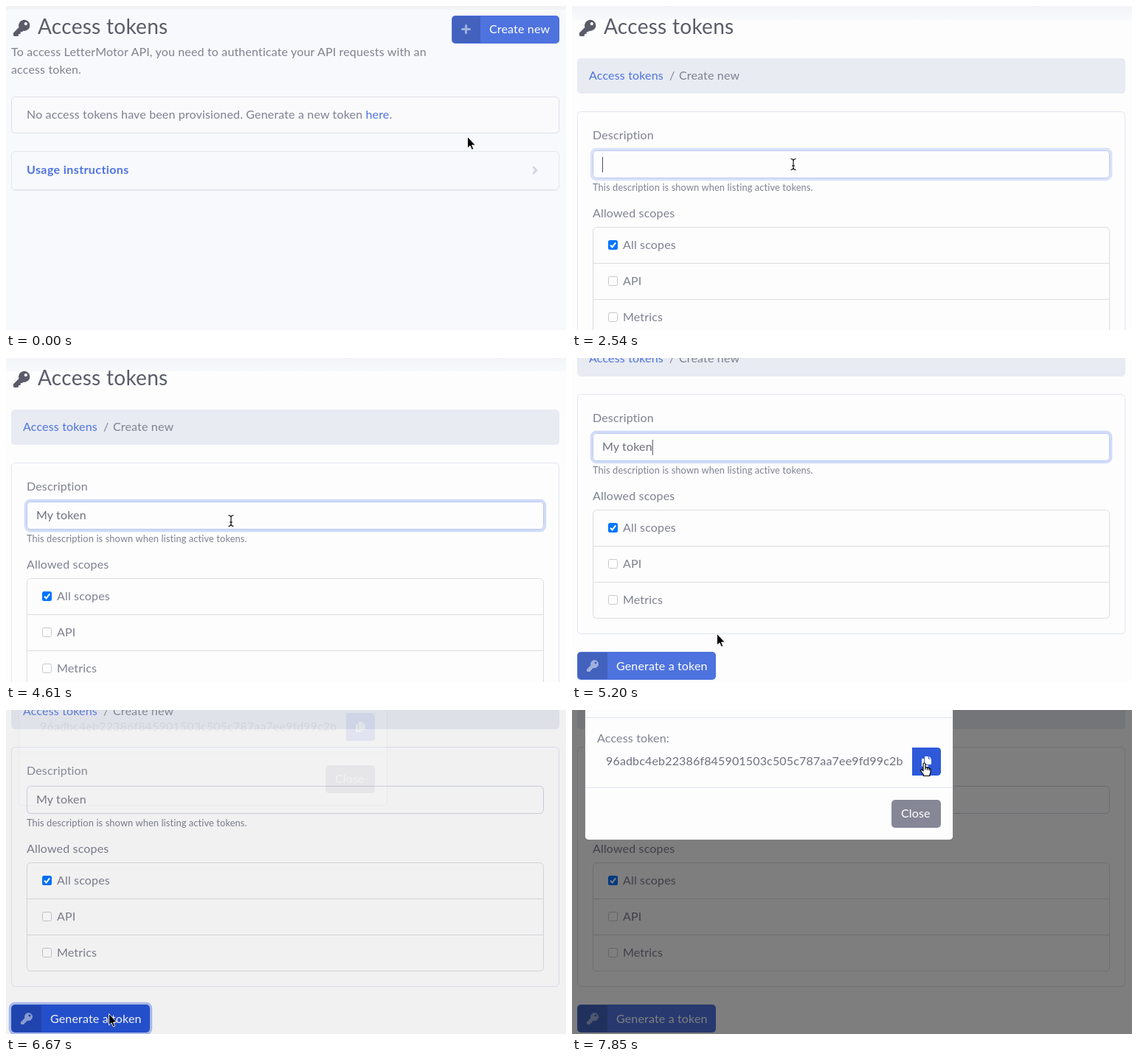
Recreate the animation shown at these times as an HTML page. Size 759 px wide and 440 px high, loop 8000 ms.

```html
<!DOCTYPE html>
<html lang="en">
<head>
<meta charset="utf-8">
<title>Access tokens</title>
<style>
  html, body { margin: 0; width: 100%; height: 100%; overflow: hidden; background: #f8f9fd; }
  svg { display: block; }
  text { font: 16px Lato, sans-serif; letter-spacing: .01em; fill: #7f8190; white-space: pre; }
  .title { font-size: 28px; fill: #5a5c69; }
  .small { font-size: 12.8px; }
  .bold { font-weight: 700; letter-spacing: .025em; }
  .link { fill: #4e73df; }
  .entry { fill: #6e707e; }
  .light { fill: #fff; }
  .shade { fill: #000; fill-opacity: .15; }
  .icon { fill: #fff; fill-opacity: .5; }
  .card { fill: none; stroke: #e3e6f0; }
  .rule { fill: none; stroke: #dcdde0; }
  .ring { fill: none; stroke-width: 3.2; }
</style>
</head>
<body>
<svg width="759" height="440" viewBox="0 0 759 440">
  <defs>
    <path id="key" fill-rule="evenodd" d="M32 11A11 11 0 0 1 19 21.8L17.4 23.5H14V26.5Q14 28 12.5 28H10V30.5Q10 32 8.5 32H1.5Q0 32 0 30.5V25.6L10.6 15A11 11 0 1 1 32 11ZM24 5a3 3 0 1 0 .01 0Z"/>
    <g id="heading">
      <use href="#key" transform="translate(10 18.5) scale(.7)" fill="#5a5c69"/>
      <text class="title" x="43" y="38">Access tokens</text>
    </g>
    <rect id="box" x="49.5" width="12" height="12" rx="2" fill="#fff" stroke="#c8c8cc"/>
    <path id="beamShape" d="M-3.5 -7.5Q0 -7 0 -5V5Q0 7 -3.5 7.5M3.5 -7.5Q0 -7 0 -5M0 5Q0 7 3.5 7.5M-2 2H2"/>
    <linearGradient id="topShade" x2="0" y2="1">
      <stop offset="0" stop-color="#f3f4f7"/>
      <stop offset="1" stop-color="#f8f9fc"/>
    </linearGradient>
    <clipPath id="tokenClip"><rect x="40" y="50" width="411" height="40"/></clipPath>
  </defs>

  <g id="listPage">
    <rect width="759" height="440" fill="#f8f9fd"/>
    <rect width="759" height="5" fill="#f2f3f5"/>
    <use href="#heading"/>
    <text x="7" y="68">To access LetterMotor API, you need to authenticate your API requests with an</text>
    <text x="7" y="92">access token.</text>
    <rect id="createRing" class="ring" x="602.4" y="11.4" width="149.2" height="41.2" rx="6.5" stroke="#6988e4" stroke-opacity=".5"/>
    <rect id="create" x="604" y="13" width="146" height="38" rx="5"/>
    <path class="shade" d="M643 14H609Q605 14 605 18V46Q605 50 609 50H643Z"/>
    <path d="M623.5 26.5V36.5M618.5 31.5H628.5" stroke="#fff" stroke-opacity=".5" stroke-width="3" stroke-linecap="round"/>
    <text class="light" x="655" y="37">Create new</text>
    <rect x="7.5" y="123.5" width="742" height="49" rx="5" fill="#fafafd" stroke="#dddfe8"/>
    <text x="28" y="153">No access tokens have been provisioned. Generate a new token <tspan class="link">here</tspan>.</text>
    <rect class="card" x="7.5" y="197.5" width="742" height="52.5" rx="5"/>
    <path d="M10 249.8H747" stroke="#dcdfe8"/>
    <text class="link bold" x="28" y="228">Usage instructions</text>
    <path d="M715 219L719 223L715 227" fill="none" stroke="#d1d3e2" stroke-width="2.6" stroke-linecap="round"/>
  </g>

  <g id="formPage">
    <rect width="759" height="440" fill="#fdfdfe"/>
    <g id="content">
      <rect width="759" height="19" fill="url(#topShade)"/>
      <use href="#heading"/>
      <rect x="7" y="71" width="743" height="48" rx="5" fill="#e8ebf2"/>
      <text class="link" x="23" y="100">Access tokens</text>
      <text x="132" y="100">/</text>
      <text x="145" y="100">Create new</text>
      <rect class="card" x="7.5" y="143.5" width="742" height="325" rx="5"/>
      <text x="28" y="181">Description</text>
      <rect id="inputRing" class="ring" x="26.4" y="194.4" width="704.2" height="41.2" rx="6.5" stroke="#4e73df"/>
      <rect id="input" x="28.5" y="196.5" width="700" height="37" rx="5" fill="#fdfdfe"/>
      <text id="typed" class="entry" x="41" y="220"></text>
      <rect id="caret" y="205" width="1" height="21" fill="#4c4d58"/>
      <text class="small" x="28" y="251">This description is shown when listing active tokens.</text>
      <text x="28" y="287">Allowed scopes</text>
      <rect class="rule" x="28.5" y="300.5" width="700" height="147" rx="5"/>
      <path class="rule" d="M29 349.5H728M29 398.5H728"/>
      <rect x="49" y="318" width="13" height="13" rx="2.5" fill="#0075ff"/>
      <path d="M52 324.8L54.6 327.4L59.2 321.4" fill="none" stroke="#fff" stroke-width="2"/>
      <use href="#box" y="367.5"/>
      <use href="#box" y="416.5"/>
      <text x="69" y="330">All scopes</text>
      <text x="69" y="379">API</text>
      <text x="69" y="428">Metrics</text>
      <rect id="generateRing" class="ring" x="5.4" y="491.4" width="191.2" height="41.2" rx="6.5" stroke="#6988e4" stroke-opacity=".5"/>
      <rect id="generate" x="7" y="493" width="188" height="38" rx="5"/>
      <path class="shade" d="M48 494H12Q8 494 8 498V526Q8 530 12 530H48Z"/>
      <use href="#key" class="icon" transform="translate(20 504) scale(.5)"/>
      <text class="light" x="60" y="518">Generate a token</text>
    </g>
  </g>

  <rect id="backdrop" width="759" height="440"/>
  <g id="modal">
    <rect x="17.5" y="-60" width="499" height="236.5" rx="5" fill="#fdfdfe" stroke="#000" stroke-opacity=".3"/>
    <path d="M18 10.5H516M18 105.5H516" stroke="#e3e6f0"/>
    <text x="34" y="44">Access token:</text>
    <text class="entry" x="46" y="75" clip-path="url(#tokenClip)">96adbc4eb22386f845901503c505c787aa7ee9fd99c2b</text>
    <path id="copy" d="M461 51H495Q500 51 500 56V84Q500 89 495 89H461Z"/>
    <path transform="translate(474 63)" fill="#fff" d="M0 4Q0 3 1 3H3V10.5Q3 12 4.5 12H9V13Q9 14 8 14H1Q0 14 0 13ZM4 1Q4 0 5 0H9V3.5H13V10Q13 11 12 11H5Q4 11 4 10ZM10 0L13 2.7H10Z"/>
    <rect x="433" y="122" width="67" height="38" rx="5" fill="#858796"/>
    <text class="light" x="446" y="146">Close</text>
  </g>

  <g id="pointer">
    <path id="arrow" d="M-.5 -.5V15L3 11.8L5.4 17.2L7.8 16.2L5.5 11H10.3Z" stroke="#fff" stroke-width=".9"/>
    <g id="beam" fill="none">
      <use href="#beamShape" stroke="#fff" stroke-width="2.6"/>
      <use href="#beamShape" stroke="#000" stroke-width="1.1"/>
    </g>
    <path id="hand" d="M-2 1.5Q-2 0 -.5 0T1 1.5V6Q2.5 5 3.6 6.6Q5 5.8 6 7.4Q8 6.8 8 9V12Q8 14 6.8 16V17.5H-1.5V16Q-3.5 13.5 -5 11Q-5.8 9 -4 8.8L-2 10.5ZM1 6V9M3.6 6.6V9.5M6 7.4V10" fill="#fff" stroke="#000" stroke-width="1.2"/>
  </g>
</svg>
<script>
const LOOP = 8000, TICK = 148.2, LAST = 53;
const PRIMARY = '#4e73df', HOVER = '#2e59d9', ACTIVE = '#2653d4';

// Tick, x, y of the pointer
const POINTER_PATH = [
  [1, 626, 178], [2, 628, 172], [3, 636, 135], [4, 650, 80], [5, 662, 45], [6, 668, 34], [7, 670, 31],
  [11, 670, 31], [12, 668, 38], [13, 505, 128], [14, 340, 200], [15, 300, 215],
  [29, 300, 215], [30, 305, 221], [33, 305, 221], [34, 250, 310], [35, 197, 375],
  [37, 178, 388], [38, 155, 404], [39, 138, 411], [40, 133, 413],
  [44, 133, 413], [45, 140, 413], [46, 178, 414], [47, 270, 350], [48, 370, 245], [49, 407, 198],
  [50, 418, 150], [51, 450, 95], [52, 474, 78], [53, 478, 72]
];
const SCROLL_PATH = [[30, 0], [31, 1], [32, 30], [33, 72], [34, 93], [35, 94], [36, 93]];

const $ = id => document.getElementById(id);
const clamp = (v, lo = 0, hi = 1) => Math.min(hi, Math.max(lo, v));
const show = (id, on) => $(id).style.display = on ? '' : 'none';
const fill = (id, color) => $(id).setAttribute('fill', color);
const move = (id, x, y) => $(id).setAttribute('transform', `translate(${x} ${y})`);
const within = (v, from, to) => v >= from && v <= to;

function sample(path, tick) {
  const next = path.findIndex(p => p[0] >= tick);
  if (next < 0) return path[path.length - 1].slice(1);
  if (next === 0) return path[0].slice(1);
  const a = path[next - 1], b = path[next], k = (tick - a[0]) / (b[0] - a[0]);
  return a.slice(1).map((v, i) => v + (b[i + 1] - v) * k);
}

function drawForm(tick) {
  const focused = within(tick, 17, 42);
  move('content', 0, -sample(SCROLL_PATH, tick)[0]);
  show('inputRing', focused);
  $('inputRing').setAttribute('stroke-opacity', tick === 17 ? .2 : .25);
  $('input').setAttribute('stroke', within(tick, 17, 44) ? '#bac8f3' : '#d1d3e2');

  $('typed').textContent = 'My token'.slice(0, clamp(tick - 19, 0, 8));
  $('caret').setAttribute('x', 41 + $('typed').getComputedTextLength());
  show('caret', focused && (tick < 30 || (tick - 30) % 8 > 3));

  fill('generate', within(tick, 43, 46) ? ACTIVE : within(tick, 38, 42) ? HOVER : PRIMARY);
  show('generateRing', within(tick, 43, 46));
}

function drawModal(tick) {
  const elapsed = tick * TICK - 6655;
  const fade = clamp(elapsed / 150);
  const slide = -50 * (1 - clamp(elapsed / 300)) ** 1.5;
  $('backdrop').setAttribute('opacity', fade / 2);
  $('modal').setAttribute('opacity', fade);
  move('modal', 0, Math.round(slide));
  fill('copy', tick >= 52 ? HOVER : PRIMARY);
}

function draw(tick) {
  show('listPage', tick < 10);
  show('formPage', tick >= 10);
  fill('create', tick >= 9 ? ACTIVE : tick >= 5 ? HOVER : PRIMARY);
  show('createRing', tick === 9);
  drawForm(tick);
  drawModal(tick);

  const hand = within(tick, 5, 9) || tick >= 52, beam = within(tick, 14, 32);
  show('hand', hand);
  show('beam', beam);
  show('arrow', !hand && !beam);
  move('pointer', ...sample(POINTER_PATH, tick));
}

function loop() {
  const t = performance.now() % LOOP;
  draw(Math.min(LAST, Math.floor((t + 5) / TICK)));
  requestAnimationFrame(loop);
}
loop();
</script>
</body>
</html>
```
